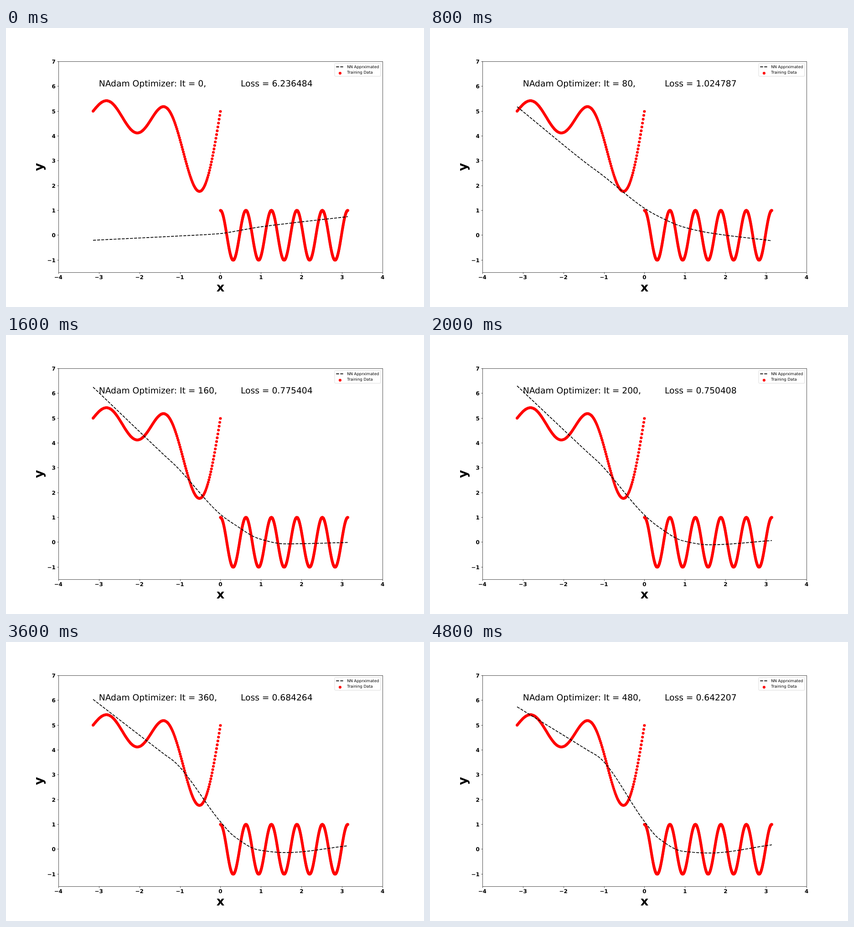
Write an HTML page that moves like this. It is 917x611 px and loops after 5 s.

```html
<!DOCTYPE html>
<html lang="en">
<head>
<meta charset="utf-8">
<title>Curve fitting</title>
<style>
html, body { margin: 0; width: 100%; height: 100%; overflow: hidden; background: #fff; }
svg { display: block; }
text { font-family: "DejaVu Sans", sans-serif; white-space: pre; text-rendering: geometricPrecision; }
.bold { font-weight: bold; text-anchor: middle; }
.tick { font-size: 11.9px; }
.label { font-size: 27.2px; }
.title { font-size: 18.7px; }
.legend { font-size: 8.5px; }
.axis { fill: none; stroke: #000; stroke-width: .68; }
.fit { fill: none; stroke: #000; stroke-width: 1.7; stroke-dasharray: 6.29 2.72; }
.dot { fill: #f00; }
</style>
</head>
<body>
<svg id="plot" width="917" height="611" viewBox="0 0 917 611"></svg>
<script>
const plot = document.getElementById('plot');
const LEFT = 114.75, RIGHT = 826.2, TOP = 73.44, BOTTOM = 535.5;
const px = x => LEFT + (x + 4) / 8 * (RIGHT - LEFT);
const py = y => BOTTOM - (y + 1.5) / 8.5 * (BOTTOM - TOP);
const snap = v => Math.round(v) + .5;

function add(tag, attrs, text = '') {
  const el = document.createElementNS('http://www.w3.org/2000/svg', tag);
  for (const key in attrs) el.setAttribute(key, attrs[key]);
  el.textContent = text;
  return plot.appendChild(el);
}
const label = (x, y, cls, text = '') => add('text', { x, y, class: cls }, text);
const dot = (cx, cy) => add('circle', { cx, cy, r: 3.05, class: 'dot' });

// Evenly spaced samples of f over [from, to]
function scatter(f, from, to, count) {
  for (let i = 0; i < count; i++) {
    const x = from + (to - from) * i / (count - 1);
    dot(px(x), py(f(x)));
  }
}

// Monotone cubic interpolation through (xs, ys)
function curve(xs, ys) {
  const n = xs.length;
  const step = i => xs[i + 1] - xs[i];
  const rise = i => (ys[i + 1] - ys[i]) / step(i);
  const slopes = xs.map((_, i) => {
    if (i === 0) return rise(0);
    if (i === n - 1) return rise(n - 2);
    const a = rise(i - 1), b = rise(i);
    return a * b <= 0 ? 0 : 2 * a * b / (a + b);
  });
  return x => {
    let i = 0;
    while (i < n - 2 && x > xs[i + 1]) i++;
    const h = step(i), t = (x - xs[i]) / h, s = 1 - t;
    return s * s * ((1 + 2 * t) * ys[i] + t * h * slopes[i]) +
           t * t * ((1 + 2 * s) * ys[i + 1] - s * h * slopes[i + 1]);
  };
}

// Key poses by iteration: the fit at its bends, then the loss
const bends = [-Math.PI, -1.4, -1.1, 0, .35, .95, 1.6, Math.PI];
const poses = {
  0: [-.2, -.06, -.035, .07, .16, .33, .465, .75, 6.236484],
  80: [5.18, 2.86, 2.5, 1.09, .76, .34, .1, -.22, 1.024787],
  120: [6.12, 3.38, 2.93, 1.15, .79, .26, 0, -.12, .819203],
  200: [6.3, 3.62, 3.17, 1.1, .62, .06, -.1, .07, .750408],
  480: [5.74, 3.99, 3.68, 1.12, .44, -.08, -.15, .18, .642207]
};
const times = Object.keys(poses).map(Number);
const tracks = poses[0].map((_, k) => curve(times, times.map(t => poses[t][k])));

scatter(x => [1, 2, 3, 4].reduce((sum, k) => sum + Math.sin(k * x), 5), -Math.PI, -.001, 200);
scatter(x => Math.cos(10 * x), 0, Math.PI, 800);
const fit = add('path', { class: 'fit' });

// Axes
const edge = { x: snap(LEFT), y: snap(TOP), right: snap(RIGHT), bottom: BOTTOM };
add('rect', { x: edge.x, y: edge.y, width: edge.right - edge.x, height: edge.bottom - edge.y, class: 'axis' });
const signed = v => String(v).replace('-', '\u2212');
for (let v = -4; v <= 4; v++) {
  add('path', { d: `M${snap(px(v))} ${BOTTOM}v3`, class: 'axis' });
  label(px(v), 550.1, 'bold tick', signed(v));
}
for (let v = -1; v <= 7; v++) {
  add('path', { d: `M${edge.x} ${Math.floor(py(v)) + .5}h-3`, class: 'axis' });
  label(108.8, py(v) + 4.35, 'bold tick', signed(v)).style.textAnchor = 'end';
}
label(px(0), 576.5, 'bold label', 'x');
add('text', { transform: 'translate(81.3 304.5) rotate(-90)', class: 'bold label' }, 'y');

// Legend
add('rect', { x: 721, y: 77.7, width: 101, height: 28, rx: 1.7,
  fill: '#fff', stroke: '#d6d6d6', 'stroke-width': .85 });
add('path', { d: 'M724.3 85.2h17', class: 'fit' });
dot(732.9, 99);
label(748.2, 87.9, 'legend', 'NN Apprximated');
label(748.2, 100.4, 'legend', 'Training Data');

const title = label(px(-3), py(6), 'title');
const loss = label(px(.5), py(6), 'title');

function pose(it) {
  const values = tracks.map(track => track(it));
  const f = curve(bends, values.slice(0, -1));
  const points = Array.from({ length: 201 }, (_, i) => {
    const x = (i / 100 - 1) * Math.PI;
    return px(x).toFixed(2) + ' ' + py(f(x)).toFixed(2);
  });
  fit.setAttribute('d', 'M' + points.join('L'));
  title.textContent = `NAdam Optimizer: It = ${it},`;
  loss.textContent = 'Loss = ' + values.at(-1).toFixed(6);
}

const start = performance.now();
function draw(now) {
  const time = Math.max(0, now - start) % 5000;
  pose(Math.floor(time / 200) * 20);
  requestAnimationFrame(draw);
}
draw(start);
</script>
</body>
</html>
```
